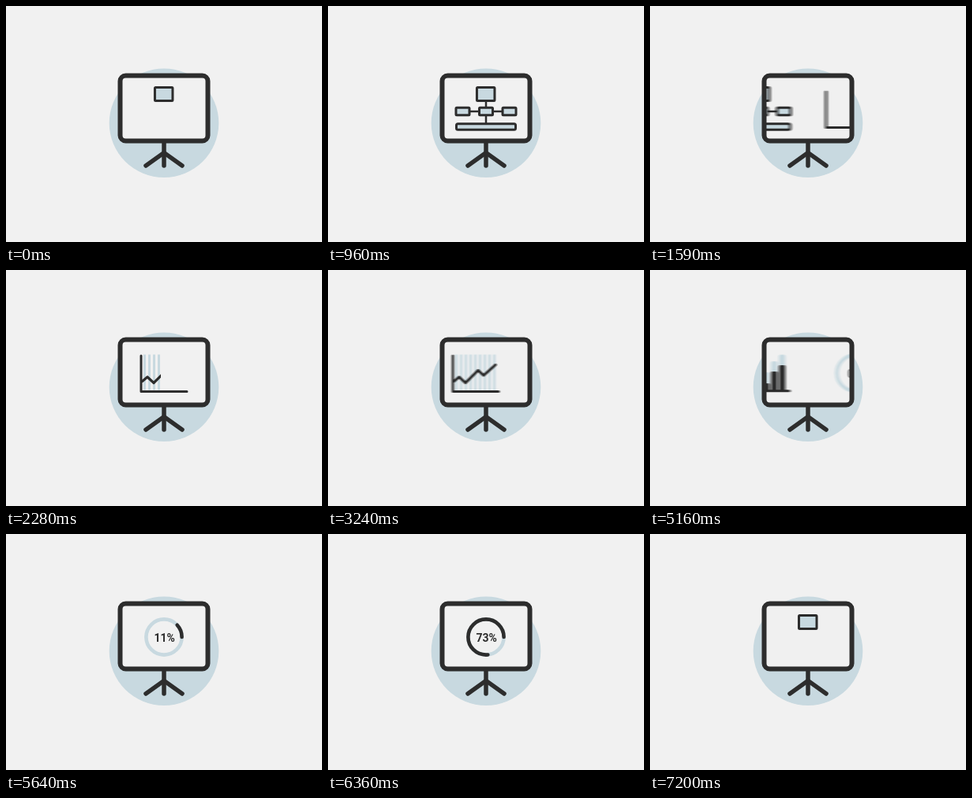
Recreate the animation shown at these times as an HTML page with a canvas. Size 400 by 300 pixels, loop 7.23 s.

```html
<!DOCTYPE html>
<html lang="en">
<head>
<meta charset="utf-8">
<title>Presentation board</title>
<style>
html, body { margin: 0; width: 100%; height: 100%; overflow: hidden; background: #f1f1f1; }
canvas { display: block; }
</style>
</head>
<body>
<canvas id="stage" width="400" height="300"></canvas>
<script>
const LOOP = 7230, FIRST_SLIDE = 1340, PERIOD = 1795, SLIDE = 480, SHIFT = 112;
const PAPER = '#f1f1f1', DARK = '#2d2d2d', BLUE = '#c8d9e0';

const view = document.getElementById('stage').getContext('2d');
const layer = document.createElement('canvas');
layer.width = 400;
layer.height = 300;
const c = layer.getContext('2d');

const clamp = v => Math.min(1, Math.max(0, v));
const span = (t, start, length) => clamp((t - start) / length);
const inOut = p => (1 - Math.cos(Math.PI * p)) / 2;
const out = p => 1 - (1 - p) ** 3;

function line(g, width, points, color = DARK) {
  g.lineWidth = width;
  g.strokeStyle = color;
  g.lineCap = g.lineJoin = 'round';
  g.beginPath();
  points.forEach(([x, y]) => g.lineTo(x, y));
  g.stroke();
}

// Outlined box that pops up around its centre
function box(x, y, w, h, r, p = 1) {
  if (!p) return;
  c.save();
  c.translate(x, y);
  c.scale(p, p);
  c.beginPath();
  c.roundRect(-w / 2, -h / 2, w, h, r);
  c.fillStyle = BLUE;
  c.fill();
  c.lineWidth = 3;
  c.strokeStyle = DARK;
  c.stroke();
  c.restore();
}

function column(x, top, r, color) {
  c.fillStyle = color;
  c.beginPath();
  c.roundRect(x, top, 8, 153 - top, [r, r, 0, 0]);
  c.fill();
}

function orgChart(t) {
  const pop = start => out(span(t, start, 270));
  const down = pop(60), side = pop(330), lower = pop(520);
  if (down) line(c, 2.5, [[200, 122], [200, 122 + 7 * down]]);
  if (side) {
    line(c, 2.5, [[200 - 20 * side, 134], [200 + 20 * side, 134]]);
  }
  if (lower) line(c, 2.5, [[200, 140], [200, 140 + 9 * lower]]);
  box(199.7, 112, 22.5, 17, 1);
  box(200, 134, 17, 9.5, 1, pop(160));
  box(170.5, 134, 17, 9.5, 1, pop(430));
  box(229.5, 134, 17, 9.5, 1, pop(430));
  box(200, 153.5, 75, 7.5, 2, inOut(span(t, 600, 260)));
}

function lineChart(t) {
  const p = span(t, 1800, 1100);
  if (p) {
    c.save();
    c.beginPath();
    c.rect(165, 100, 7 + 55 * p, 60);
    c.clip();
    c.fillStyle = BLUE;
    for (let x = 174; x < 227; x += 6) c.fillRect(x, 107.5, 3, 45);
    line(c, 3.2, [[172.5, 141.5], [179, 136], [187, 143.5], [203, 127.5], [210, 134], [225, 120.5]]);
    c.restore();
  }
  line(c, 3, [[171, 109], [171, 154.5], [229, 154.5]]);
}

function barChart(t) {
  const light = [127, 122, 130, 116, 107.5];
  const dark = [138, 132, 144, 129, 121];
  light.forEach((top, i) => {
    const x = 176 + 10 * i, p = span(t, 3300 + 216 * i, 480);
    column(x, top, 3, BLUE);
    if (p) column(x, 153 - (153 - dark[i]) * p, 2, DARK);
  });
  line(c, 3, [[171, 153.7], [229, 153.7]]);
}

function ring(angle, color) {
  c.beginPath();
  c.arc(200, 131, 22.6, 0, -angle * Math.PI / 180, true);
  c.lineWidth = 4.6;
  c.lineCap = 'round';
  c.strokeStyle = color;
  c.stroke();
}

function donut(t) {
  const p = inOut(span(t, 5400, 940));
  ring(360, BLUE);
  if (p) ring(276 * p, DARK);
  c.fillStyle = DARK;
  c.font = 'bold 14px Roboto, "Liberation Sans", sans-serif';
  c.textAlign = 'center';
  c.fillText(Math.round(73 * p) + '%', 200.7, 137);
}

const slides = [orgChart, lineChart, barChart, donut];
const moved = (t, k) => inOut(span(t, FIRST_SLIDE + k * PERIOD, SLIDE));

function drawSlides(t) {
  c.fillStyle = PAPER;
  c.fillRect(0, 0, 400, 300);
  for (let k = 0; k <= 4; k++) {
    const x = SHIFT * ((k ? 1 - moved(t, k - 1) : 0) - (k < 4 ? moved(t, k) : 0));
    if (Math.abs(x) >= SHIFT) continue;
    c.save();
    c.translate(x, 0);
    slides[k % 4](k < 4 ? t : t - LOOP);
    c.restore();
  }
}

function draw(t) {
  view.fillStyle = PAPER;
  view.fillRect(0, 0, 400, 300);
  view.fillStyle = BLUE;
  view.beginPath();
  view.arc(200, 148.7, 69.3, 0, 7);
  view.fill();

  line(view, 5.5, [[200, 172], [200, 203]]);
  line(view, 5.5, [[177, 203], [200, 186.5], [223, 203]]);

  // Average several moments for motion blur while sliding
  const sliding = slides.some((_, k) => moved(t, k) % 1 > 0);
  const samples = sliding ? 7 : 1;
  view.save();
  view.beginPath();
  view.roundRect(144.5, 88.5, 111, 83, 7);
  view.clip();
  for (let i = 0; i < samples; i++) {
    drawSlides(t + 2.3 * (i - (samples - 1) / 2));
    view.globalAlpha = 1 / (i + 1);
    view.drawImage(layer, 0, 0);
  }
  view.restore();

  view.lineWidth = 6;
  view.strokeStyle = DARK;
  view.beginPath();
  view.roundRect(144.5, 88.5, 111, 83, 7);
  view.stroke();
}

const begin = performance.now();
function tick() {
  draw((performance.now() - begin) % LOOP);
  requestAnimationFrame(tick);
}
tick();
</script>
</body>
</html>
```
